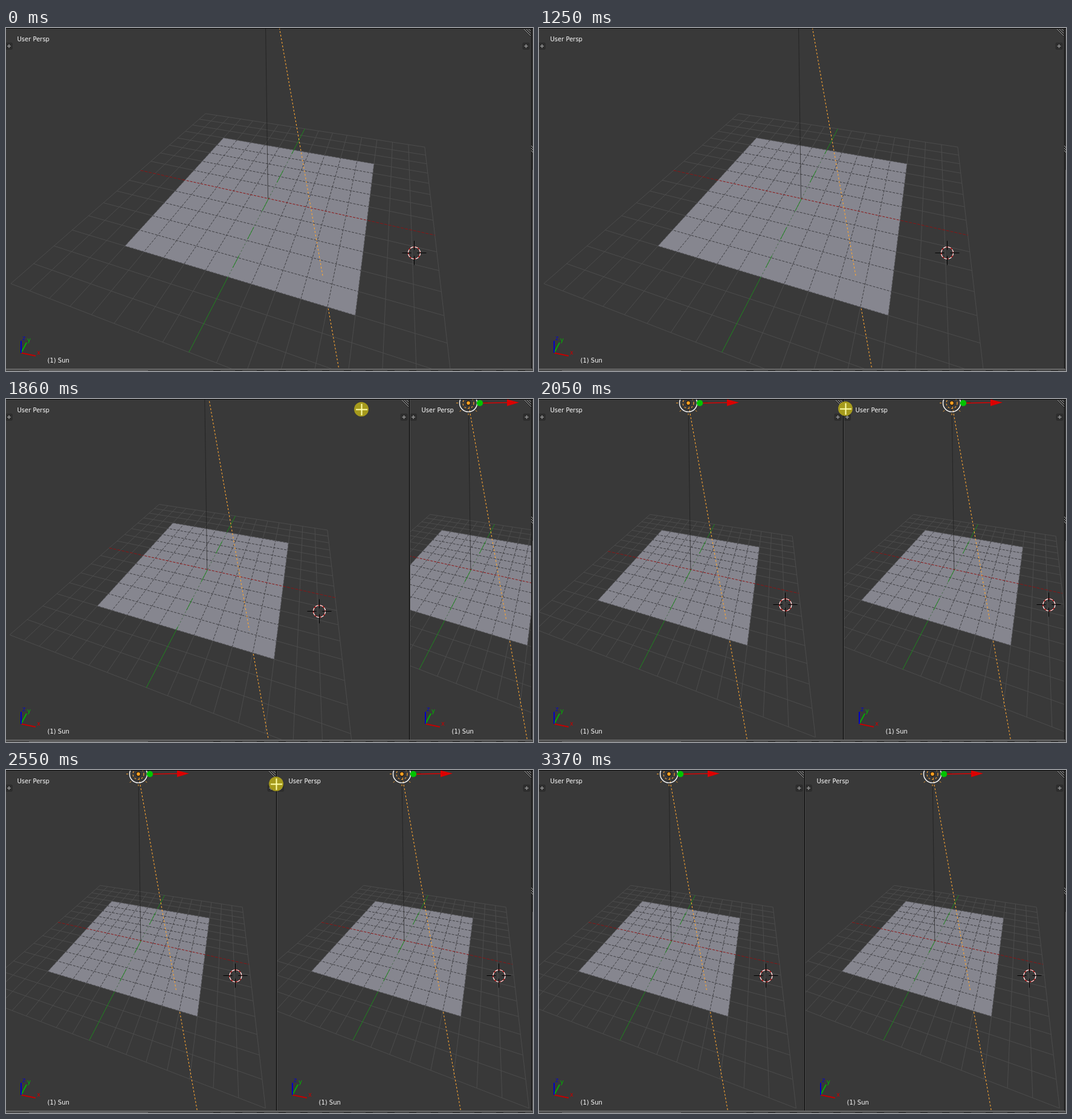
An HTML page with a canvas that plays this animation: 872 px wide and 568 px high, repeating every 3.82 s.

```html
<!DOCTYPE html>
<html lang="en">
<head>
<meta charset="utf-8">
<title>Splitting a 3D view</title>
<style>
html, body { margin: 0; width: 100%; height: 100%; overflow: hidden; background: #393939; }
canvas { display: block; }
</style>
</head>
<body>
<canvas id="stage" width="872" height="568"></canvas>
<script>
const W = 872, H = 568, LOOP = 3820;
const RIGHT = 869, TOP = 1, BOTTOM = 564, MID_Y = 282.5;
const ctx = document.getElementById('stage').getContext('2d');

// Dragging the split: time, divider x, pointer x, pointer y
const drag = [
  [1580, 866, 858, 9], [1640, 857, 846, 10], [1700, 845, 812, 12],
  [1750, 811, 748, 14], [1810, 747, 668, 16], [1860, 667, 588, 17],
  [1910, 587, 548, 17], [1960, 547, 526, 16], [2000, 525, 514, 16],
  [2050, 503, 507, 16], [2100, 498, 500, 16], [2130, 491, 490, 16],
  [2180, 479, 479, 15], [2230, 473, 472, 16], [2430, 469, 466, 18],
  [2470, 464, 460, 20], [2510, 457, 453, 22], [2550, 447, 447, 23],
  [2580, 443, 444, 23], [2630, 439, 442, 23]
];

// Ground plane to view offset at full width; the mesh spans -1..1
function project(x, y) {
  const w = 1 - 0.0811 * x + 0.2345 * y;
  return [(149.65 * x + 51.5 * y) / w, (32.98 * x - 99.38 * y) / w];
}

const SUN = [-6.9, -425], HIT = [90, 130.5], EXIT = [98.7, 182], TAIL = [116.5, 282];

function line(a, b, color, width = 1, dash = [], offset = 0) {
  ctx.strokeStyle = color;
  ctx.lineWidth = width;
  ctx.setLineDash(dash);
  ctx.lineDashOffset = offset;
  ctx.beginPath();
  ctx.moveTo(...a);
  ctx.lineTo(...b);
  ctx.stroke();
  ctx.setLineDash([]);
}

function ring(x, y, r, color, width = 1, dash = []) {
  ctx.strokeStyle = color;
  ctx.lineWidth = width;
  ctx.setLineDash(dash);
  ctx.lineDashOffset = 0;
  ctx.beginPath();
  ctx.arc(x, y, r, 0, 7);
  ctx.stroke();
  ctx.setLineDash([]);
}

function dot(x, y, r, color) {
  ctx.fillStyle = color;
  ctx.beginPath();
  ctx.arc(x, y, r, 0, Math.PI * 2);
  ctx.fill();
}

function shape(points, color) {
  ctx.beginPath();
  points.forEach(p => ctx.lineTo(...p));
  ctx.closePath();
  ctx.fillStyle = color;
  ctx.fill();
}

function rect(x, y, w, h, color) {
  ctx.fillStyle = color;
  ctx.fillRect(x, y, w, h);
}

function text(s, x, y, color = '#fff', size = 10) {
  ctx.font = size + 'px "DejaVu Sans", sans-serif';
  ctx.fillStyle = color;
  ctx.fillText(s, x, y);
}

function cross(x, y, inner, outer, color, width) {
  for (const [dx, dy] of [[1, 0], [-1, 0], [0, 1], [0, -1]])
    line([x + dx * inner, y + dy * inner], [x + dx * outer, y + dy * outer], color, width);
}

function grid(at, color, dash) {
  for (let i = -8; i <= 8; i++) {
    if (!i) continue;
    const k = i / 5;
    line(at(k, -1.6), at(k, 1.6), color, 1, dash);
    line(at(-1.6, k), at(1.6, k), color, 1, dash);
  }
}

function scene(cx, scale) {
  const put = ([x, y]) => [cx + x * scale, MID_Y + y * scale];
  const at = (x, y) => put(project(x, y));
  const corners = [at(-1, 1), at(1, 1), at(1, -1), at(-1, -1)];
  const sun = put(SUN);

  grid(at, '#4c4c4c');
  line(at(0, -1.6), at(0, 1.6), '#1e861e');
  line(at(-1.6, 0), at(1.6, 0), '#8c1414', 1, [5, 2]);

  shape(corners, '#86868f');
  ctx.save();
  ctx.clip();
  grid(at, '#3e3e42', [4, 2]);
  line(at(0, 0), at(0, 1), '#4a6a4e', 1, [3, 3]);
  line(at(0, 0), at(0, -1), '#4a6a4e', 1, [3, 3]);
  line(at(0, 0), at(0, -1.6), '#1e861e', 1, [23, 30]);
  line(at(0, 0), at(0, 1.6), '#1e861e', 1, [23, 30], 23);
  line(at(-1.6, 0), at(1.6, 0), '#8c1414', 1, [4, 2]);
  ctx.restore();

  line(sun, put([-1, 0]), 'rgba(25,25,25,.65)');
  line(sun, put(HIT), '#ffa733', 1.1, [3, 3]);
  line(put(EXIT), [put(EXIT)[0] + (BOTTOM - put(EXIT)[1]) * 0.176, BOTTOM], '#ffa733', 1.1, [3, 3]);

  cursor3d(...put([241, 90]));
  lamp(...sun);
}

function cursor3d(x, y) {
  ring(x, y, 10, '#e01010', 1.2);
  ring(x, y, 10, '#fff', 1.2, [5, 3]);
  cross(Math.floor(x) + 0.5, Math.floor(y) + 0.5, 5, 20, '#000', 1);
}

function lamp(x, y) {
  for (let i = 0; i < 8; i++) {
    const a = i * Math.PI / 4, c = Math.cos(a), s = Math.sin(a);
    line([x + 17 * c, y + 17 * s], [x + 22 * c, y + 22 * s], '#ffa733', 1, [3, 3]);
  }
  ring(x, y, 9, '#ffa733', 1.2, [3, 3]);
  ring(x, y, 14.5, '#fff', 1.4);
  dot(x, y, 3.8, '#1a1008');
  dot(x, y, 2.8, '#ffa020');
  line([x + 15, y], [x + 32, y - 0.4], '#5a0808', 1.3);
  line([x + 24, y], [x + 66, y - 0.7], '#dc0000', 1.5);
  dot(x + 19, y, 5.2, '#00c400');
  shape([[x + 64, y - 6], [x + 84, y - 1], [x + 64, y + 5]], '#dc0000');
}

function tab(x) {
  ctx.fillStyle = '#2d2d2d';
  ctx.beginPath();
  ctx.roundRect(x - 6, 24, 12, 12, 3);
  ctx.fill();
  cross(x, 30, 0, 3, '#8c8c8c', 1.6);
}

function hatch(right) {
  for (const n of [11, 7, 3]) {
    line([right - n, 3], [right, 3 + n], '#111');
    line([right - n, 2], [right, 2 + n], '#aaa');
  }
}

function axes(x) {
  const o = [x + 25, 538];
  line(o, [x + 49, 543], '#c40000', 1.8);
  line(o, [x + 34, 521], '#00b400', 1.8);
  line(o, [x + 25, 518], '#0000c8', 2);
  text('x', x + 51, 541, '#c40000');
  text('y', x + 35, 520, '#00b400');
  text('z', x + 27, 517, '#0a0ac0');
}

function view(left, right) {
  const w = right - left;
  if (w <= 0) return;
  ctx.save();
  ctx.beginPath();
  ctx.rect(left, TOP, w, BOTTOM - TOP);
  ctx.clip();
  rect(left, 0, w, H, '#393939');
  scene((left + right) / 2, Math.max(w, BOTTOM) / RIGHT);
  axes(left);
  tab(left + 5);
  tab(right - 8.5);
  hatch(right - 1);
  text('User Persp', left + 18.5, 22);
  text('(1) Sun', left + 68.5, 554);
  ctx.restore();
}

function frameEdges() {
  rect(0, 0, W, 1, '#050505');
  rect(0, 564, W, 2, '#666');
  rect(0, 566, W, 2, '#454545');
  rect(38, 567, 197, 1, '#777');
  for (let x = 343; x < 860; x += 36) rect(x, 567, 12, 1, '#222');
  rect(869, 0, 1, BOTTOM, '#050505');
  rect(870, 1, 2, BOTTOM, '#484848');
  rect(871, 1, 1, 234, '#202020');
  for (const y of [195, 199, 203]) line([869, y], [872, y + 3], '#aaa');
}

function arrow(x, y) {
  const tip = [[0, 0], [0, 16], [4, 12.5], [6.5, 18], [9, 17], [6.5, 11.5], [11.5, 11.5]]
    .map(([a, b]) => [x + a, y + b]);
  shape(tip, '#fff');
  ctx.strokeStyle = '#000';
  ctx.lineWidth = 1;
  ctx.stroke();
}

function pressed(x, y) {
  dot(x, y, 12, '#a59a1c');
  cross(x + 0.5, y + 0.5, 0, 9.5, '#ffffa8', 2);
}

// Arrow travels in discrete steps and is gone on the last one
function travel(t, start, end, steps, a, b) {
  if (t < start || t >= end) return;
  const n = Math.floor((t - start) / (end - start) * (steps - 1));
  const p = n / Math.max(1, steps - 2), e = p * p * (3 - 2 * p);
  arrow(a[0] + (b[0] - a[0]) * e, a[1] + (b[1] - a[1]) * e);
}

function pointer(t, step) {
  travel(t, 120, 648, 12, [509, 533], [746, 39]);
  travel(t, 648, 880, 6, [746, 39], [854, 6]);
  if (t >= 1120 && t < 1250) cross(872, 3.5, 0, 9, '#ddd', 1.5);
  if (step && t < 2960) pressed(step[2], step[3]);
  travel(t, 2960, 3370, 8, [442, 23], [813, 560]);
}

function draw(t) {
  const step = drag.filter(s => s[0] <= t).pop();
  const split = step ? step[1] : RIGHT;
  rect(0, 0, W, H, '#393939');
  view(0, split);
  if (step) {
    view(split + 2, RIGHT + 1);
    rect(split, 0, 1, BOTTOM, '#050505');
    rect(split + 1, 1, 1, BOTTOM - 1, '#4c4c4c');
  }
  frameEdges();
  pointer(t, step);
}

function tick() {
  draw(performance.now() % LOOP);
  requestAnimationFrame(tick);
}
tick();
</script>
</body>
</html>
```
